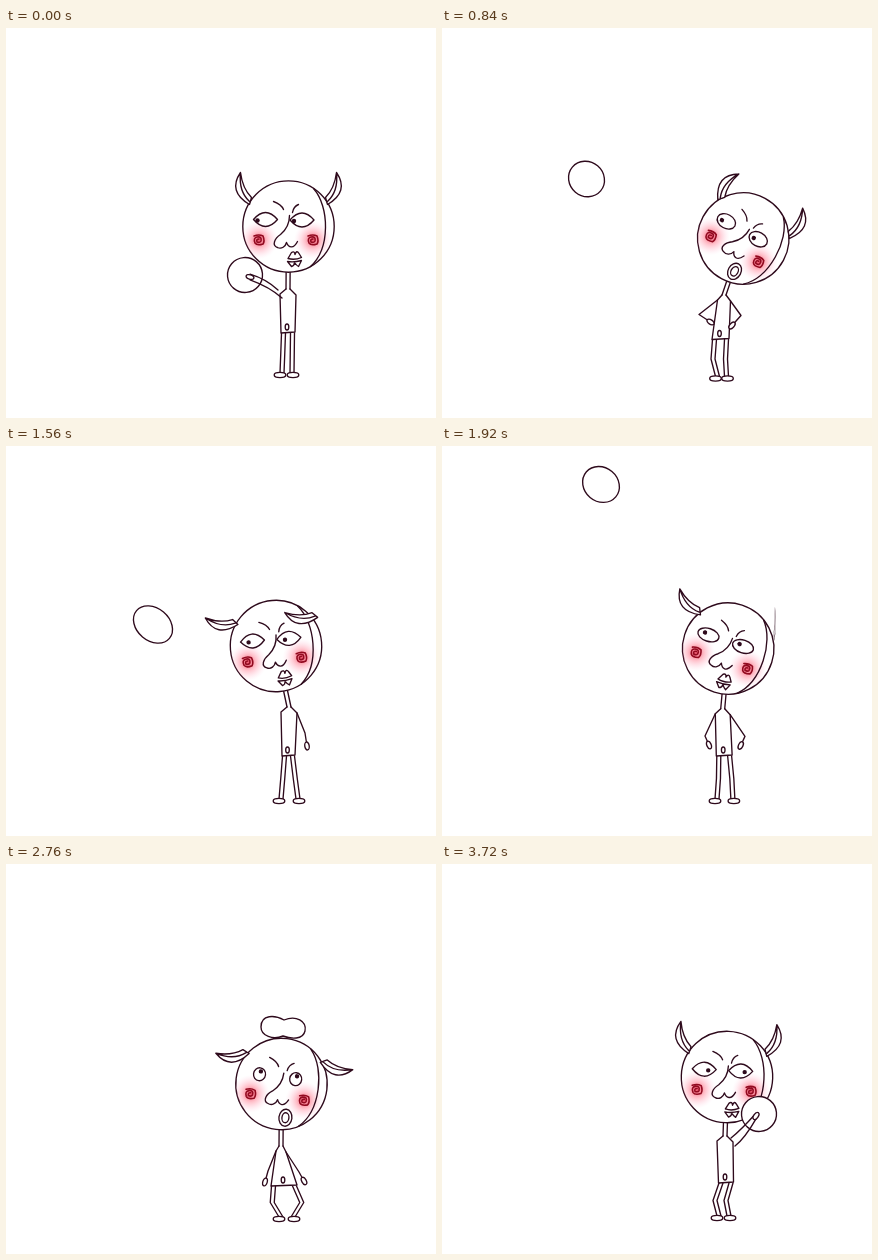
These frames come from a looping animation (430x390 px, 3.78 s). An HTML page with a canvas:

```html
<!DOCTYPE html>
<html>
<head>
<meta charset="utf-8">
<style>
  html, body { margin: 0; width: 100%; height: 100%; overflow: hidden; background: #fff; }
  canvas { display: block; }
</style>
</head>
<body>
<canvas id="stage" width="430" height="390"></canvas>
<script>
const ctx = document.getElementById('stage').getContext('2d');
const LOOP = 3780, STEP = 60, INK = '#2e0a1c';

// neck: x, y, half shoulder; hip: x, y, half width; arms: elbow, hand; legs: knee bends, feet x, floor y
const bodies = [
  { t: 0, neck: [282, 261, 8], hip: [282, 305, 7], left: [262, 255, 244, 249], right: null, legs: [0, 0, 274, 287, 347], sleeve: [4] },
  { t: 540, neck: [280, 261, 7], hip: [280, 306, 7.5], left: [257, 284, 267, 291], right: [301, 284, 293, 291], legs: [0, 0, 274, 286, 349], sleeve: [0] },
  { t: 1140, neck: [284, 273, 6], hip: [277, 317, 9.5], left: [257, 289, 270, 297], right: [297, 291, 287, 304], legs: [-6, -2, 273, 285, 352], sleeve: [0] },
  { t: 1560, neck: [283, 261, 8], hip: [282.5, 310, 6.5], left: null, right: [299, 287, 301, 300], legs: [0, 0, 273, 293, 355], sleeve: [0] },
  { t: 2220, neck: [279, 264, 7], hip: [282, 310, 9], left: [263, 290, 267, 299], right: [306, 293, 297, 299], legs: [1, 1, 273, 291, 355], sleeve: [0] },
  { t: 2760, neck: [275, 282, 5], hip: [278, 322, 13], left: [262, 307, 259, 318], right: [293, 308, 298, 317], legs: [-5, 8, 273, 288, 355], sleeve: [0] },
  { t: 3720, neck: [283, 272, 8], hip: [284, 319, 7.5], left: null, right: [301, 270, 314, 252], legs: [-5, -4, 275, 288, 354], sleeve: [4] }
];

// pos: x, y, tilt; horns: extra turn of each, flip of the right one; look: pupil shift; eye: half size
const faces = [
  { t: 0, pos: [282.5, 198.5, 0], horns: [0, 0, 1], look: [-8, 1], eye: [12, 7] },
  { t: 540, pos: [281.5, 199.5, 0], horns: [0, 0, 1], look: [-8, 1], eye: [12, 7] },
  { t: 1140, pos: [321, 221.5, 57], horns: [53, -41, 1], look: [-1, 1], eye: [7.5, 7], gasp: true },
  { t: 1560, pos: [270, 200, -5], horns: [-58, -61, -1], look: [-4, 1], eye: [12, 7] },
  { t: 2220, pos: [298.5, 204.5, 35], horns: [-27, 14, 1], look: [-4, -3], eye: [10, 6] },
  { t: 2760, pos: [275.5, 220, 7], horns: [-81, 80, 1], look: [1, -3], eye: [6, 6.5], gasp: true },
  { t: 3720, pos: [285, 213, 2], horns: [0, 0, 1], look: [4, 1], eye: [12, 7] }
];

// time, x, y, height of the arc to the next point, stretch
const flight = [
  [0, 239, 247, 0, 0], [60, 236, 244, 25, 0], [420, 160, 332, 0, 2],
  [540, 134, 290, 90, 2], [1140, 155, 192, 15, 0], [1320, 165, 332, 10, 3],
  [1560, 147, 178.5, 70, 4], [2220, 169, 49, 20, 0], [2760, 277, 163, 0, 0],
  [2820, 277, 163, 110, 0], [3480, 317, 262, 0, 0], [3720, 317, 250, 0, 0]
];

const NOSE = new Path2D('M1-11C1-2-2 3-8 8C-14 12-17 19-11 21C-7 23-3 20-2 16C0 21 5 23 9 15');
const BROWS = new Path2D('M-15-25Q-7-22-5-17M10-22Q5-20 4-14');
const RIM = new Path2D('M25-38C41-20 42 22 22 40');
const LIPS = new Path2D('M-.5 32L3 26Q6 24 6.5 28Q8 23 10.5 27L13 31Q6 34-.5 32M-1 35L3 40Q6 39 6 36Q8 39 10 40L13 34Q6 36-1 35');
const HORN = new Path2D('M-8-28Q-21-9 1 4L3-3Q-6-12-8-28Q-10-9 1 1');
const SWIRL = new Path2D('M-5-4Q0-6 4-4Q6 1 4 4Q-2 6-4 3Q-6-2-2-3Q3-4 2 1Q1 3-2 2Q-3-1 0-1');
const BEAN = new Path2D('M-22 0C-22-13-8-12 1-7C13-12 24-6 22 4C20 13 8 12 0 9C-10 13-22 9-22 0Z');

const lerp = (a, b, p) => a + (b - a) * p;
const ease = p => p * p * (3 - 2 * p);

function span(keys, time, t) {
  let i = 0;
  while (i < keys.length - 2 && time(keys[i + 1]) <= t) i++;
  const a = keys[i], b = keys[i + 1];
  return [a, b, Math.min(1, (t - time(a)) / (time(b) - time(a)))];
}

function poseAt(keys, t) {
  const [a, b, raw] = span(keys, k => k.t, t), p = ease(raw);
  const near = raw < 0.5 ? a : b, pose = { gasp: near.gasp };
  for (const name in a) {
    if (name === 't' || name === 'gasp') continue;
    pose[name] = a[name] && b[name] ? a[name].map((v, i) => lerp(v, b[name][i], p)) : near[name];
  }
  return pose;
}

function line(points, fill) {
  ctx.beginPath();
  points.forEach(([x, y]) => ctx.lineTo(x, y));
  if (fill) ctx.fill();
  ctx.stroke();
}

function oval(x, y, rx, ry = rx, turn = 0) {
  ctx.beginPath();
  ctx.ellipse(x, y, rx, ry, turn, 0, 7);
  ctx.fill();
  ctx.stroke();
}

function at(x, y, degrees, draw) {
  ctx.save();
  ctx.translate(x, y);
  ctx.rotate(degrees * Math.PI / 180);
  draw();
  ctx.restore();
}

function drawBody({ neck: [nx, ny, s], hip: [hx, hy, w], legs: [bendL, bendR, footL, footR, floor] }, [headX, headY]) {
  for (const [side, bend, foot] of [[-1, bendL, footL], [1, bendR, footR]]) {
    const top = hx + side * (w - 2.5), end = side < 0 ? foot + 2 : foot - 1;
    const knee = (top + end) / 2 + bend;
    for (const d of [-2, 2]) line([[top + d, hy], [knee + d, (hy + floor) / 2], [end + d, floor - 2]]);
    oval(foot, floor, 5.8, 2.6);
  }
  line([[nx - 2, ny], [nx - s, ny + 5], [hx - w, hy], [hx + w, hy - 1], [nx + s, ny + 6], [nx + 2, ny]], true);
  oval(hx - 1, hy - 6, 1.8, 3);
  for (const d of [-2, 2]) line([[headX + d, headY], [nx + d, ny]]);
}

function drawArm(arm, x, y, sleeve) {
  if (!arm) return;
  const [ex, ey, hx, hy] = arm, wide = sleeve > 0.5;
  for (const d of wide ? [-sleeve, sleeve] : [0]) {
    ctx.beginPath();
    ctx.moveTo(x + d / 2, y + d);
    if (wide) ctx.quadraticCurveTo(ex + d / 2, ey + d, hx, hy + d * 0.7);
    else { ctx.lineTo(ex, ey); ctx.lineTo(hx, hy); }
    ctx.stroke();
  }
  oval(hx, hy, 4, 2.2, Math.atan2(hy - ey, hx - ex));
}

function drawCheek(x, y) {
  const glow = ctx.createRadialGradient(x, y, 1, x, y, 19);
  glow.addColorStop(0, 'rgba(235,40,70,.75)');
  glow.addColorStop(0.4, 'rgba(255,100,125,.4)');
  glow.addColorStop(1, 'rgba(255,190,220,0)');
  ctx.fillStyle = glow;
  ctx.fillRect(x - 20, y - 20, 40, 40);
  at(x, y, 0, () => {
    ctx.strokeStyle = '#920a20';
    ctx.lineWidth = 1.6;
    ctx.stroke(SWIRL);
  });
}

function drawEye(x, y, [w, h], [lookX, lookY]) {
  ctx.fillStyle = '#fff';
  if (w < 11) oval(x, y, w, h);
  else {
    ctx.beginPath();
    ctx.moveTo(x - w, y);
    ctx.quadraticCurveTo(x, y - 2 * h, x + w, y);
    ctx.quadraticCurveTo(x, y + 2 * h, x - w, y);
    ctx.fill();
    ctx.stroke();
  }
  ctx.fillStyle = INK;
  ctx.beginPath();
  ctx.arc(x + lookX, y + lookY, 2.2, 0, 7);
  ctx.fill();
}

function drawHead({ pos, horns: [turnL, turnR, flip], look, eye, gasp }) {
  at(...pos, () => {
    oval(0, 0, 45.7);
    ctx.save();
    ctx.clip();
    drawCheek(-29.5, 13.5);
    drawCheek(24.5, 13.5);
    ctx.restore();
    ctx.stroke(RIM);
    ctx.stroke(BROWS);
    ctx.stroke(NOSE);
    drawEye(-23, -7, eye, look);
    drawEye(13.5, -6.5, eye, look);
    ctx.fillStyle = '#fff';
    if (gasp) {
      oval(8, 33, 6.5, 8.5);
      oval(8, 33, 3.5, 5);
    } else ctx.stroke(LIPS);
    for (const [x, turn, scale] of [[-40, turnL, 1], [40, turnR, -flip]]) {
      at(x, -26, turn, () => {
        ctx.scale(scale, 1);
        ctx.fill(HORN);
        ctx.stroke(HORN);
      });
    }
  });
}

function drawBall(t) {
  const [a, b, p] = span(flight, k => k[0], t);
  const x = lerp(a[1], b[1], p), y = lerp(a[2], b[2], p) - 4 * a[3] * p * (1 - p);
  const stretch = lerp(a[4], b[4], p);
  if (t >= 2760 && t < 2820) {
    at(x, y, 0, () => { ctx.fill(BEAN); ctx.stroke(BEAN); });
  } else oval(x, y, 17.5 + stretch, 17.5 - stretch * 0.3, 0.7);
}

function draw(t) {
  const body = poseAt(bodies, t), face = poseAt(faces, t);
  const [nx, ny, s] = body.neck;
  ctx.fillStyle = '#fff';
  ctx.fillRect(0, 0, 430, 390);
  ctx.strokeStyle = INK;
  ctx.lineWidth = 1.35;
  ctx.lineJoin = ctx.lineCap = 'round';
  drawBody(body, face.pos);
  drawHead(face);
  drawBall(t);
  drawArm(body.left, nx - s, ny + 5, body.sleeve[0]);
  drawArm(body.right, nx + s, ny + 6, body.sleeve[0]);
}

function tick() {
  draw(Math.floor(performance.now() % LOOP / STEP) * STEP);
  requestAnimationFrame(tick);
}
tick();
</script>
</body>
</html>
```
